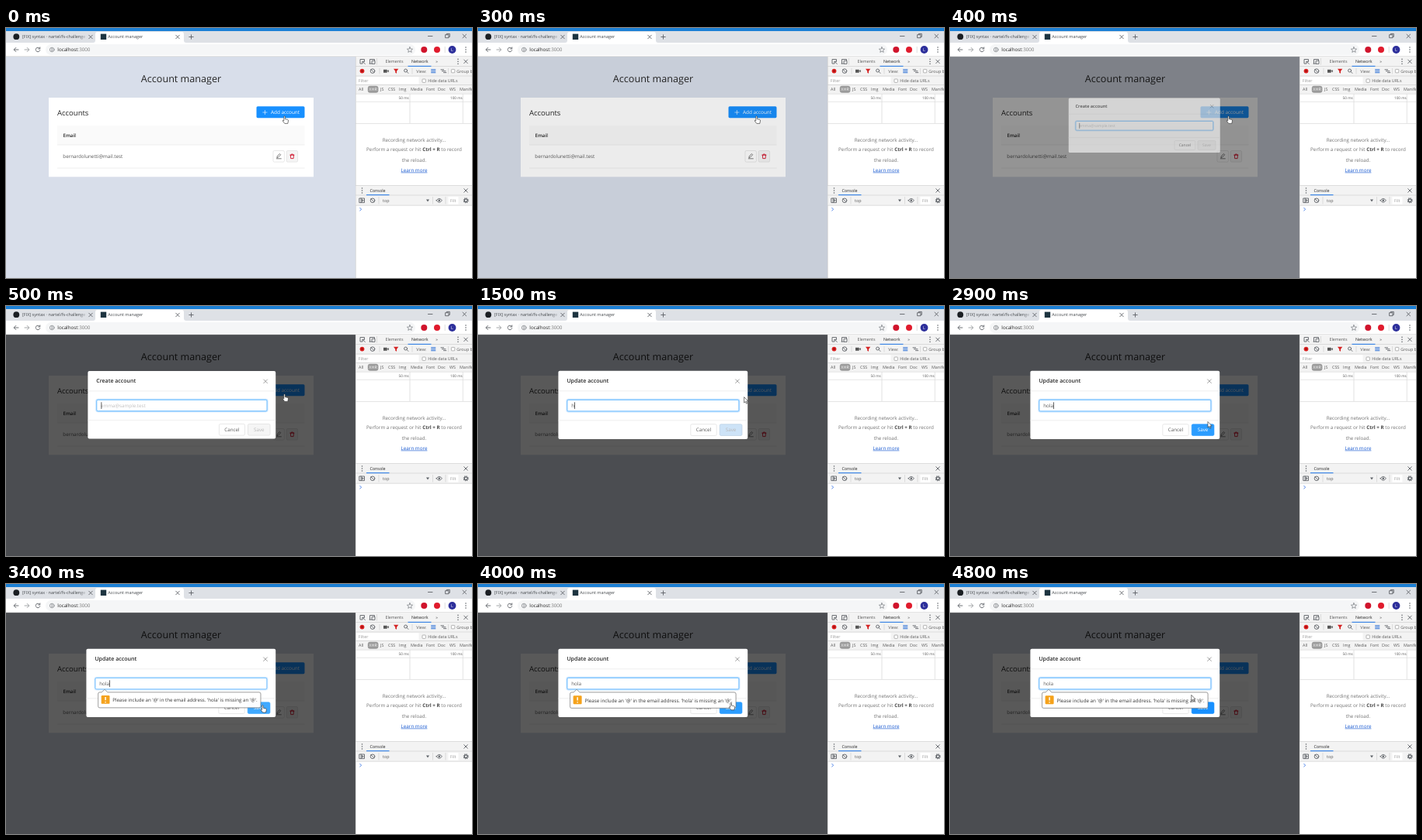
These frames come from a looping animation (600 by 323 pixels, 5000 ms). An HTML page:

```html
<!DOCTYPE html>
<html lang="en">
<head>
<meta charset="utf-8">
<title>Account manager</title>
<style>
  html, body { margin: 0; width: 100%; height: 100%; overflow: hidden; background: #fff; }
  svg { display: block; width: 100vw; height: 100vh; }
  text { font: 6.27px "Open Sans", "Noto Sans", sans-serif; fill: #595959; text-rendering: geometricPrecision; white-space: pre; }
  .mid { text-anchor: middle; }
  .semi { font-weight: 600; fill: #262626; }
  .med { font-weight: 500; fill: #262626; }
  .tab { font-size: 5.5px; fill: #45494d; }
  .dev { font-size: 5.4px; fill: #5a5a5a; }
  .tiny { font-size: 4.7px; fill: #555; }
  .hint { fill: #737373; }
  .ln { fill: none; stroke: #5f6368; stroke-width: .9; stroke-linecap: round; stroke-linejoin: round; }
  .bar { fill: #f3f3f3; }
  .rule { fill: none; stroke: #d0d0d0; stroke-width: .7; }
  .box { fill: #fff; stroke: #d9d9d9; stroke-width: .6; }
</style>
</head>
<body>
<svg viewBox="0 0 600 323" preserveAspectRatio="none">
  <defs>
    <linearGradient id="fade"><stop offset="0" stop-color="#dee1e6" stop-opacity="0"/><stop offset="1" stop-color="#dee1e6"/></linearGradient>
    <path id="x" class="ln" d="M-2.3-2.3 2.3 2.3M2.3-2.3-2.3 2.3"/>
    <g id="dots" fill="#5f6368"><circle cy="-3" r=".8"/><circle r=".8"/><circle cy="3" r=".8"/></g>
    <g id="no" class="ln"><circle r="2.8"/><path d="M-2-2 2 2"/></g>
    <g id="trash" class="ln"><path d="M-2.6-1.7H2.6M-1-1.7V-2.8H1V-1.7M-2-1.7-1.7 2.8H1.7L2-1.7"/></g>
  </defs>

  <!-- page -->
  <rect y="37" width="450.5" height="286" fill="#d8deea"/>
  <text class="med mid" x="225.5" y="70.3" style="font-size:12.6px">Account manager</text>
  <rect x="55" y="90" width="341" height="102.3" fill="#fff"/>
  <text class="med" x="66" y="112.5" style="font-size:9.5px">Accounts</text>
  <rect id="add" x="322.5" y="101.2" width="62" height="15" rx="1.6" fill="#1890ff"/>
  <path class="ln" d="M330.8 109H336M333.4 106.4V111.6" style="stroke:#fff;stroke-width:.6"/>
  <text x="341" y="111.1" style="fill:#fff;font-size:6.37px">Add account</text>
  <rect x="66" y="126" width="318.5" height="25" fill="#fafafa"/>
  <path class="rule" d="M66 151H384.5M66 181H384.5" style="stroke:#e8e8e8"/>
  <text class="semi" x="73.5" y="140.7" style="font-size:6.2px">Email</text>
  <text x="73.3" y="168.2">bernardolunetti@mail.test</text>
  <rect class="box" x="344" y="158.5" width="14.4" height="14.6" rx="1.6"/>
  <path class="ln" d="M348.9 167.3 349.3 165.5 352.4 162.5 353.7 163.8 350.6 166.9ZM348.3 168.8H354.3" style="stroke:#444;stroke-width:.7"/>
  <rect class="box" x="361.2" y="158.5" width="14.4" height="14.6" rx="1.6" style="fill:#f5f5f5"/>
  <use href="#trash" x="368.4" y="165.8" style="--c:0" id="bin"/>
  <rect id="mask" y="37" width="450.5" height="286"/>

  <!-- browser frame -->
  <rect width="600" height="4" fill="#1c80d5"/>
  <rect y="4" width="600" height="15" fill="#dee1e6"/>
  <path d="M112 19Q115 19 115 16V8Q115 5 118 5H226Q229 5 229 8V16Q229 19 232 19Z" fill="#fff"/>
  <circle cx="13.3" cy="11.2" r="3.9" fill="#1b1f23"/>
  <text class="tab" x="21" y="13.3">[FIX] syntax · nartel/fs-challenge</text>
  <rect x="95" y="6" width="9" height="11" fill="url(#fade)"/>
  <rect x="103.9" y="6" width="9" height="11" fill="#dee1e6"/>
  <use href="#x" x="109" y="11.5"/>
  <rect x="121.8" y="7.6" width="7.4" height="7.4" fill="#1d3440"/>
  <text class="tab" x="131.2" y="13.3">Account manager</text>
  <use href="#x" x="221" y="11.5"/>
  <path class="ln" d="M235.8 11.5H241.2M238.5 8.8V14.2M543.5 10.5H549M588 8.2 592.6 12.8M592.6 8.2 588 12.8"/>
  <rect class="ln" x="566" y="8.7" width="4" height="4"/>
  <path class="ln" d="M567.3 8.5V7.4H571.3V11.4H570.2"/>
  <rect y="19" width="600" height="18" fill="#fff"/>
  <rect x="51" y="21" width="476" height="14" rx="7" fill="#f5f6f7"/>
  <path class="rule" d="M0 36.7H600"/>
  <path class="ln" d="M16 28H10.3M12.8 25.4 10.2 28 12.8 30.6"/>
  <path class="ln" d="M24 28H29.7M27.2 25.4 29.8 28 27.2 30.6" style="stroke:#9a9da0"/>
  <path class="ln" d="M43.3 26.2A2.8 2.8 0 1 0 43.8 28.7M43.8 24.9V26.9H41.7"/>
  <g class="ln"><circle cx="59.2" cy="28" r="2.8" stroke-width=".6"/><path d="M59.2 27.8V29.4M59.2 26.4V26.5"/></g>
  <text x="66.3" y="30.2" style="fill:#777;font-size:6.25px"><tspan fill="#222">localhost</tspan>:3000</text>
  <path class="ln" d="M520 24.6 521 27 523.6 27.2 521.6 28.9 522.2 31.4 520 30 517.8 31.4 518.4 28.9 516.4 27.2 519 27Z" style="stroke-width:.6"/>
  <circle cx="538.3" cy="28" r="4" fill="#d0142c"/>
  <circle cx="555" cy="28" r="4" fill="#e01b2d"/>
  <path class="rule" d="M565.2 24V32"/>
  <circle cx="574.5" cy="28" r="4.9" fill="#2d2f9b"/>
  <text class="mid" x="574.5" y="30" style="font-size:5.4px;fill:#fff">L</text>
  <use href="#dots" x="592" y="28"/>

  <!-- developer panel -->
  <rect x="450" y="37" width="150" height="286" fill="#fff"/>
  <rect class="bar" x="450" y="37" width="150" height="48"/>
  <path class="rule" d="M450.4 37V323M450 49.5H600M450 62H600M450 73.5H600M450 85.3H600M450 123.3H600M520 85.3V123M588.3 85.3V123M477.5 39V47.5M481 52V59.5M523 52V59.5M569.5 52V59.5"/>
  <path d="M517.5 49.3H547.5" stroke="#1a73e8" stroke-width="1"/>
  <path class="ln" d="M461.5 43V40.5H456V46H458.5M459 43.2 462.3 46.5M459 45.8V43.2H461.6"/>
  <path class="ln" d="M468.5 46V40.5H474.5V42M471.5 42.3H475V46.3H471.5ZM468 46H471"/>
  <text class="dev" x="488.4" y="45.1">Elements</text>
  <text class="dev" x="522" y="45.1" style="fill:#222">Network</text>
  <text class="dev" x="553.3" y="45.1">»</text>
  <use href="#dots" x="582" y="43.3"/><use href="#x" x="592" y="43.3"/>
  <circle cx="458.5" cy="55.6" r="2.9" fill="#db1f1f"/><circle cx="458.5" cy="55.6" r="1.1" fill="#8d1010"/>
  <use href="#no" x="472" y="55.6"/>
  <path d="M486 53.7H490.7V57.7H486ZM490.7 55.6 492.8 54V57.4Z" fill="#555"/>
  <path d="M499 52.8H505.3L503 55.8V58.8L501.3 57.8V55.8Z" fill="#d42020"/>
  <g class="ln"><circle cx="514.6" cy="55" r="2"/><path d="M516.2 56.6 518 58.4"/></g>
  <text class="dev" x="528.3" y="57.6">View:</text>
  <path d="M547.2 53.7H553.3M547.2 55.7H553.3M547.2 57.7H553.3" stroke="#2b6fd6" stroke-width="1"/>
  <path class="ln" d="M560 53.8H563.6M561.5 55.7H566M563.5 57.6H566.8"/>
  <rect class="box" x="573.4" y="53.4" width="4.4" height="4.4" rx=".8" style="stroke:#888"/>
  <text class="dev" x="580.3" y="57.6">Group by</text>
  <rect x="451.5" y="63.2" width="80" height="9.4" fill="#fff"/>
  <text class="dev" x="453.8" y="70.2" style="fill:#999">Filter</text>
  <rect class="box" x="536" y="66" width="4.4" height="4.4" rx=".8" style="stroke:#888"/>
  <text class="dev" x="543.2" y="70.2">Hide data URLs</text>
  <rect x="465.8" y="74.8" width="13.6" height="9" rx="3" fill="#9a9a9a"/>
  <g id="types"></g>
  <rect x="451" y="85.7" width="149" height="37.3" fill="#fff" opacity=".8"/>
  <path class="rule" d="M520 85.7V123M588.3 85.7V123M451 95.3H600" style="stroke:#ddd"/>
  <text class="tiny" x="505.6" y="91.8">50 ms</text>
  <text class="tiny" x="572" y="91.8">100 ms</text>
  <g class="mid">
    <text class="hint" x="525.5" y="146.7">Recording network activity...</text>
    <text class="hint" x="525.5" y="159.3">Perform a request or hit <tspan font-weight="700" fill="#444">Ctrl + R</tspan> to record</text>
    <text class="hint" x="525.5" y="172.5">the reload.</text>
    <text x="525.5" y="185.6" style="fill:#1a5ad0;text-decoration:underline">Learn more</text>
  </g>
  <rect class="bar" x="450.8" y="203.5" width="149.2" height="25.7"/>
  <path class="rule" d="M450 203.5H600M450 216H600M450 229.2H600M480 218V227.5M549.5 218V227.5M566 218V227.5"/>
  <path d="M464 215.7H493.5" stroke="#1a73e8" stroke-width="1"/>
  <use href="#dots" x="458.5" y="210"/>
  <text class="dev" x="468.4" y="211.9" style="fill:#222">Console</text>
  <use href="#x" x="592" y="210"/>
  <path class="ln" d="M455.2 220H461.5V225.6H455.2ZM457.2 220V225.6M458.7 221.6 460.4 222.8 458.7 224Z"/>
  <use href="#no" x="472" y="222.8"/>
  <text class="dev" x="485" y="224.7">top</text>
  <path d="M541 221.5H545L543 224.6Z" fill="#5f6368"/>
  <path class="ln" d="M554.2 222.8Q557.8 217.8 561.4 222.8Q557.8 227.8 554.2 222.8Z"/><circle cx="557.8" cy="222.8" r="1.3" fill="#5f6368"/>
  <rect x="569.5" y="218" width="13" height="9.7" fill="#fff"/>
  <text class="dev" x="572" y="224.7" style="fill:#999">Filt</text>
  <circle class="ln" cx="592.2" cy="222.8" r="1.9" style="stroke-width:1.3"/>
  <circle class="ln" cx="592.2" cy="222.8" r="3" style="stroke-width:1.1;stroke-dasharray:1.2 1.156;stroke-linecap:butt"/>
  <path class="ln" d="M455.7 232.3 457.6 234.2 455.7 236.1" style="stroke:#3b78e7"/>

  <!-- dialog -->
  <g id="modal">
    <rect x="103.4" y="83.8" width="243.8" height="88.2" rx="2" fill="#fff"/>
    <path class="rule" d="M103.4 109.8H347.2M103.4 147.8H347.2" style="stroke:#e8e8e8"/>
    <text id="head" class="semi" x="114.4" y="99.3" style="font-size:7.05px"></text>
    <path class="ln" d="M331.6 94.8 336.4 99.6M336.4 94.8 331.6 99.6" style="stroke:#777;stroke-width:.7"/>
    <rect id="glow" x="114" y="120.4" width="222.8" height="16.4" rx="2.4" fill="none" stroke="#1890ff" stroke-width="1.2"/>
    <rect x="114.9" y="121.3" width="221" height="14.6" rx="1.7" fill="#fff" stroke="#40a9ff" stroke-width=".8"/>
    <text id="value" x="120.2" y="130.9"></text>
    <rect id="caret" y="124.3" width=".7" height="8.8" fill="#222"/>
    <rect class="box" x="273.8" y="152.7" width="33.4" height="14.8" rx="1.7"/>
    <text class="mid" x="290.5" y="162.3">Cancel</text>
    <rect id="save" x="311.2" y="152.7" width="28.8" height="14.8" rx="1.7" stroke-width=".6"/>
    <text id="saveText" class="mid" x="325.6" y="162.3">Save</text>
  </g>

  <!-- validation bubble -->
  <g id="tip">
    <path d="M120.5 140H123.2L127 136.2 130.8 140H330Q332 140 332 142V158.3Q332 160.3 330 160.3H120.5Q118.5 160.3 118.5 158.3V142Q118.5 140 120.5 140Z" fill="#fff" stroke="#8c8c8c" stroke-width=".7" style="filter:drop-shadow(.4px .8px .7px #0005)"/>
    <rect x="122.6" y="144.2" width="11" height="11" rx="1.2" fill="#f5a21b"/>
    <path d="M128.1 146.2V150.6M128.1 152.3V153.6" stroke="#fff" stroke-width="1.5"/>
    <text x="137.4" y="152.6" style="font-size:6.25px;fill:#333">Please include an '@' in the email address. 'hola' is missing an '@'.</text>
  </g>

  <g id="cursor" stroke="#222" stroke-width=".6" fill="#fff" stroke-linejoin="round">
    <path id="arrow" d="M0 0V7.4L1.7 5.9 2.9 8.6 4.1 8.1 2.9 5.4H5.3Z"/>
    <path id="hand" d="M0 .8Q.8-.4 1.6 .8V4L5 4.8Q5.9 5.1 5.7 6.3L5 9.8H1L-1.6 6.4Q-1.7 5 0 6.2Z"/>
  </g>
</svg>
<script>
const $ = id => document.getElementById(id);
const TICK = 100, TICKS = 50;

const types = { All: 454, XHR: 467.3, JS: 482, CSS: 492, Img: 506, Media: 521, Font: 541, Doc: 556, WS: 571, Manifest: 584 };
for (const [name, x] of Object.entries(types)) {
  const el = document.createElementNS("http://www.w3.org/2000/svg", "text");
  el.setAttribute("class", "dev");
  el.setAttribute("x", x);
  el.setAttribute("y", 81.3);
  el.textContent = name;
  if (name === "XHR") el.style.fill = "#fff";
  $("types").append(el);
}
$("bin").style.stroke = "#d0142c";
$("trash").querySelector("path").style.stroke = "#d0142c";

// Keys are [tick, value, ...]; values between keys are linear.
const MASK = [[1, 0], [2, .02], [3, .075], [4, .42], [5, .65]];
const ZOOM = [[3, .2], [4, .8], [5, .992], [6, 1]];
const SHOW = [[3, 0], [4, .6], [5, 1]];
const READY = [[14, 0], [15, .18], [16, .6], [17, 1]];
const HOVER = [[28, 0], [30, 1], [39, 1], [41, 0]];
const GLOW = [[30, .25], [31, .05], [34, .15], [35, .25]];
const TIP = [[32, 0], [33, .55], [34, .98], [35, 1]];
const TIP_ZOOM = [[32, .85], [33, .93], [34, .98], [35, 1]];
const POINTER = [
  [6, 357.8, 113.6], [9, 342.6, 117.6], [18, 342.6, 117.6], [21, 341.4, 122.6],
  [25, 341.4, 122.6], [30, 329.6, 156.2], [38, 329.6, 156.2], [46, 310.8, 143.4]
];
const TYPED = [[0, ""], [14, "h"], [16, "ho"], [18, "hol"], [20, "hola"]];
const BLINK = [[0, 1], [9, 0], [13, 1], [22, 0], [27, 1], [31, 0], [32, 1], [37, 0], [42, 1], [47, 0]];

function at(keys, n, i = 1) {
  const k = keys.findIndex(key => key[0] > n);
  if (k < 0) return keys[keys.length - 1][i];
  if (k === 0) return keys[0][i];
  const a = keys[k - 1], b = keys[k];
  return a[i] + (b[i] - a[i]) * (n - a[0]) / (b[0] - a[0]);
}
const held = (keys, n) => keys.filter(key => key[0] <= n).pop()[1];
const mix = (a, b, p) => a.map((v, i) => Math.round(v + (b[i] - v) * p));
const rgb = c => `rgb(${c})`;
const zoom = (x, y, s) => `translate(${x} ${y}) scale(${s}) translate(${-x} ${-y})`;

const BLUE = [24, 144, 255], LIGHT = [64, 169, 255];

function draw(n) {
  $("mask").setAttribute("opacity", at(MASK, n));
  $("modal").setAttribute("transform", zoom(350, 117, at(ZOOM, n)));
  $("modal").setAttribute("opacity", at(SHOW, n));
  $("head").textContent = n < 14 ? "Create account" : "Update account";

  const typed = held(TYPED, n), value = $("value");
  value.textContent = typed;
  const end = typed ? value.getComputedTextLength() : 0;
  if (!typed) value.textContent = "emma@sample.test";
  value.style.fill = typed ? "#595959" : "#bfbfbf";
  $("caret").setAttribute("x", 120.2 + end + (typed ? .2 : .5));
  $("caret").setAttribute("opacity", held(BLINK, n));
  $("glow").setAttribute("opacity", at(GLOW, n));

  const ready = at(READY, n);
  const on = n === 31 ? [9, 109, 217] : mix(BLUE, LIGHT, at(HOVER, n));
  $("save").setAttribute("fill", rgb(mix([245, 245, 245], on, ready)));
  $("save").setAttribute("stroke", rgb(mix([217, 217, 217], on, ready)));
  $("saveText").style.fill = rgb(mix([184, 184, 184], [255, 255, 255], ready > .5 ? ready : 0));

  $("tip").setAttribute("opacity", at(TIP, n));
  $("tip").setAttribute("transform", zoom(127, 137, at(TIP_ZOOM, n)));

  const x = at(POINTER, n), y = at(POINTER, n, 2);
  const hand = n < 7 || (n > 28 && y > 152.5);
  $("cursor").setAttribute("transform", `translate(${x} ${y})`);
  $("hand").setAttribute("opacity", hand ? 1 : 0);
  $("arrow").setAttribute("opacity", hand ? 0 : 1);
}

function loop() {
  draw(Math.floor(performance.now() / TICK) % TICKS);
  requestAnimationFrame(loop);
}
loop();
</script>
</body>
</html>
```
